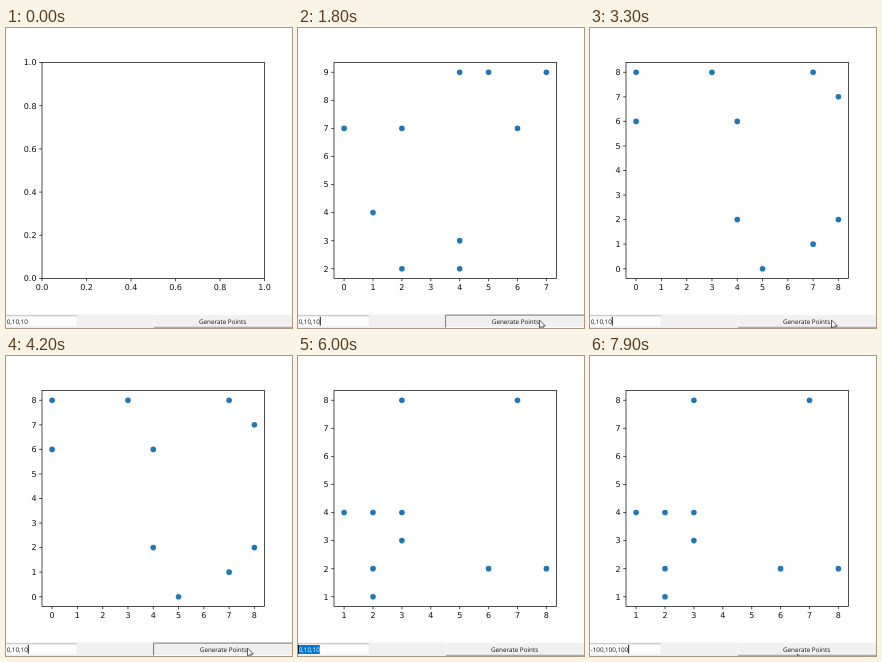
These frames come from a looping animation (286x300 px, 8 s). An HTML page:

```html
<!DOCTYPE html>
<html lang="en">
<head>
<meta charset="utf-8">
<title>Random points</title>
<style>
html, body { margin: 0; width: 100%; height: 100%; overflow: hidden; background: #fff; }
svg { display: block; width: 286px; height: 300px; }
text { text-rendering: geometricPrecision; }
#plot text { font: 8px "DejaVu Sans", sans-serif; fill: #111; }
.ui { font: 6.3px "Open Sans", "Noto Sans", sans-serif; fill: #111; }
</style>
</head>
<body>
<svg viewBox="0 0 286 300">
  <rect width="286" height="300" fill="#fff"/>
  <g id="plot"></g>
  <rect y="286.5" width="286" height="13.5" fill="#f0f0f0"/>
  <rect y="287.6" width="71.5" height="11.4" fill="#fff"/>
  <path d="M0 287.8H71.3" stroke="#a5a5a5" stroke-width=".7"/>
  <path d="M0 298.9H71.3V288" fill="none" stroke="#e0e0e0" stroke-width=".6"/>
  <rect id="select" y="289" height="9" fill="#0078d7"/>
  <text id="entry" class="ui" x=".7" y="295.8"></text>
  <rect id="caret" y="288.8" width=".9" height="8.8" fill="#000"/>
  <g id="raised" fill="none" stroke-width=".8">
    <path d="M148 299V287H286" stroke="#fafafa"/>
    <path d="M148 299.3H286" stroke="#858585"/>
  </g>
  <g id="sunken" fill="none" stroke-width="1">
    <path d="M147.6 299.5V287.1H286" stroke="#787878"/>
    <path d="M148 299.5H286" stroke="#fafafa"/>
  </g>
  <text id="label" class="ui" y="295.8">Generate Points</text>
  <path id="arrow" d="M0 0V8.2L1.9 6.5 3.2 9.4 4.4 8.9 3.2 6H5.8Z" fill="#fff" stroke="#222" stroke-width=".7"/>
  <path id="beam" d="M-1.6 -4H1.6M0 -4V4M-1.6 4H1.6" stroke="#111" stroke-width=".9"/>
</svg>
<script>
const $ = id => document.getElementById(id);
const LOOP = 8000, STEP = 100;
const BOX = { x: 36, y: 34.5, w: 222.5, h: 216 };

// Each plot: start time, tick step, points written as "xy" digit pairs
const PLOTS = [
  { at: 0, step: 0.2, pts: [] },
  { at: 700, step: 1, pts: '07 14 22 27 42 43 49 59 67 79' },
  { at: 2000, step: 2, pts: '09 07 28 27 49 64 86 99 94 90' },
  { at: 3300, step: 1, pts: '08 06 38 46 42 50 78 71 87 82' },
  { at: 4300, step: 1, pts: '14 24 34 38 33 22 21 62 78 82' }
].map(p => ({ ...p, pts: p.pts.length ? p.pts.split(' ').map(s => [+s[0], +s[1]]) : [] }));

const PRESSES = [500, 1800, 3100, 4100];
const CARET_ON = [[500, 1100], [1400, 2000], [2300, 2900], [3200, 3900], [4200, 4800],
  [5100, 5700], [6000, 7500], [7800, 8000]];
const TYPED = [[0, '0,10,10'], [6600, '-1'], [6700, '-100'], [6900, '-100,100,100']];
// Pointer path: time, x, y
const MOUSE = [[500, 241.5, 292], [4300, 241.5, 292], [4600, 140, 294], [4900, 38, 295],
  [5100, 23, 295], [5300, 9, 295], [5400, -8, 295], [7500, 38, 284], [7600, 72, 287],
  [7900, 207.6, 298]];

const within = (t, a, b) => t >= a && t < b;
const latest = (list, t, key) => list.reduce((hit, item) => item[key] <= t ? item : hit);
const show = (el, on) => el.setAttribute('visibility', on ? 'visible' : 'hidden');

function axis(values, start, size) {
  const some = values.length > 0;
  const lo = some ? Math.min(...values) : 0, hi = some ? Math.max(...values) : 1;
  const pad = some ? (hi - lo) * 0.05 : 0;
  const map = v => start + size * (v - lo + pad) / (hi - lo + 2 * pad);
  return { lo, hi, map };
}

function ticks({ lo, hi, map }, step, draw) {
  let out = '';
  for (let i = Math.ceil(lo / step); i * step <= hi + 1e-6; i++) {
    out += draw(map(i * step), (i * step).toFixed(step < 1 ? 1 : 0));
  }
  return out;
}

function plotMarkup({ step, pts }) {
  const { x, y, w, h } = BOX, bottom = y + h;
  const ax = axis(pts.map(p => p[0]), x, w);
  const ay = axis(pts.map(p => p[1]), bottom, -h);
  const dots = pts.map(p =>
    `<circle cx="${ax.map(p[0])}" cy="${ay.map(p[1])}" r="2.8" fill="#1f77b4"/>`).join('');
  const line = (d) => `<path d="${d}" stroke="#222" stroke-width=".8"/>`;
  return dots +
    `<rect x="${x}" y="${y}" width="${w}" height="${h}" fill="none" stroke="#222" stroke-width=".8"/>` +
    ticks(ax, step, (p, s) => line(`M${p} ${bottom}v2.8`) +
      `<text x="${p}" y="262.1" text-anchor="middle">${s}</text>`) +
    ticks(ay, step, (p, s) => line(`M${x} ${p}h-2.8`) +
      `<text x="30.5" y="${p + 2.9}" text-anchor="end">${s}</text>`);
}

function mouseAt(t) {
  const i = MOUSE.findIndex(m => m[0] > t);
  const b = i < 0 ? MOUSE[MOUSE.length - 1] : MOUSE[i];
  const a = i < 0 ? b : MOUSE[Math.max(0, i - 1)];
  const k = a === b ? 0 : (t - a[0]) / (b[0] - a[0]);
  return [a[1] + (b[1] - a[1]) * k, a[2] + (b[2] - a[2]) * k];
}

let shown = null;
function render(t) {
  const plot = latest(PLOTS, t, 'at');
  if (plot !== shown) {
    $('plot').innerHTML = plotMarkup(plot);
    shown = plot;
  }

  const pressed = PRESSES.some(p => within(t, p, p + 200));
  show($('raised'), !pressed);
  show($('sunken'), pressed);
  $('label').setAttribute('x', pressed ? 193.8 : 193);

  const [mx, my] = mouseAt(t);
  const text = latest(TYPED, t, 0)[1];
  const selecting = within(t, 5300, 6600);
  const from = selecting ? (t < 5400 ? mx : 0) : 21.8;
  $('entry').textContent = text;
  $('entry').style.fill = selecting && t >= 5400 ? '#fff' : '#111';
  show($('select'), selecting);
  $('select').setAttribute('x', from);
  $('select').setAttribute('width', 21.8 - from);

  const end = 0.7 + $('entry').getComputedTextLength();
  $('caret').setAttribute('x', selecting ? from : end);
  show($('caret'), CARET_ON.some(([a, b]) => within(t, a, b)));

  const visible = within(t, 500, 5400) || t >= 7500;
  const overEntry = mx < 71;
  for (const id of ['arrow', 'beam']) {
    $(id).setAttribute('transform', `translate(${mx} ${my})`);
    show($(id), visible && overEntry === (id === 'beam'));
  }
}

const start = performance.now();
function tick() {
  const t = (performance.now() - start) % LOOP;
  render(Math.floor(t / STEP) * STEP);
  requestAnimationFrame(tick);
}
tick();
</script>
</body>
</html>
```
